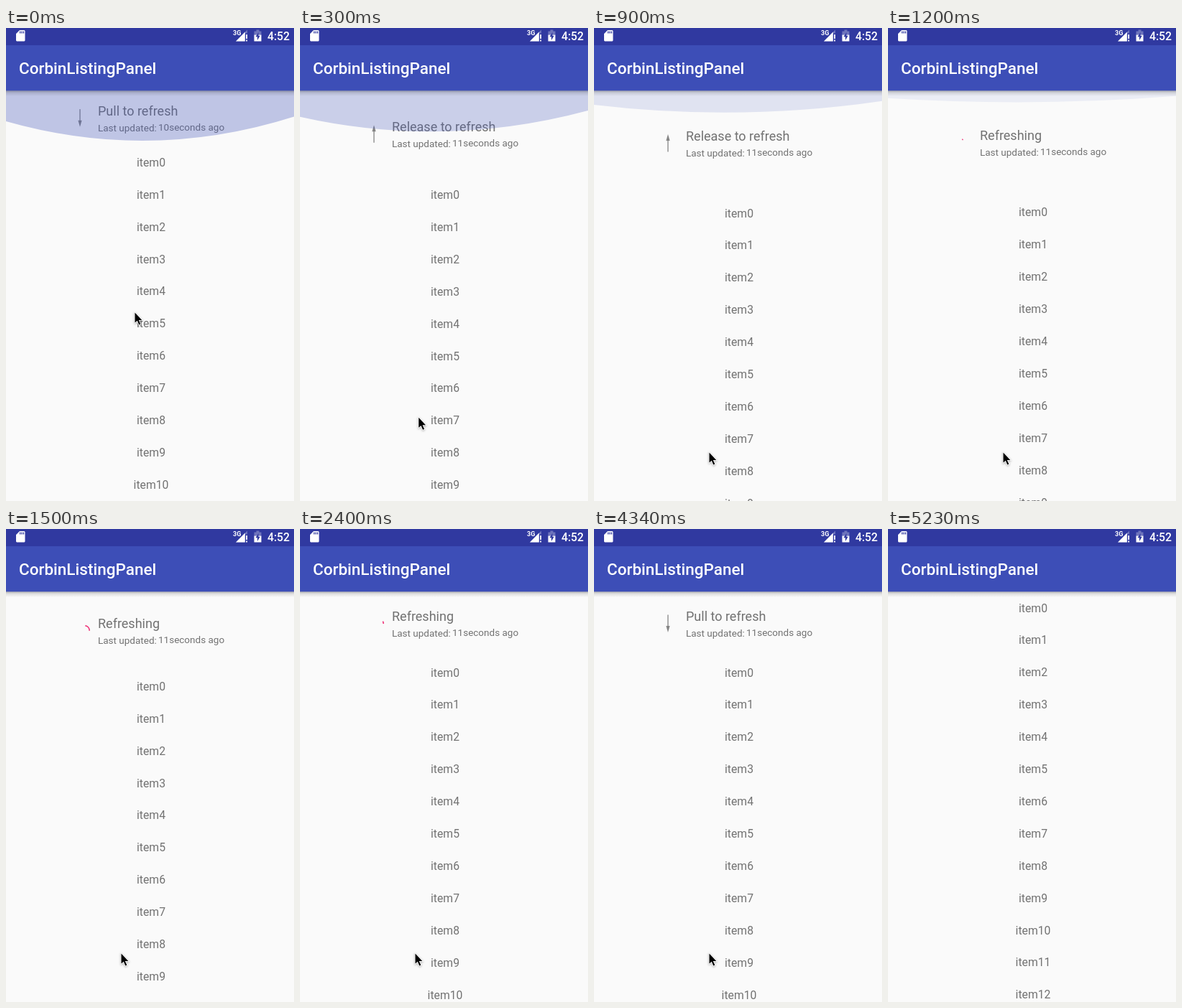
An HTML page with a canvas that plays this animation: 401 px wide and 659 px high, repeating every 6120 ms.

```html
<!DOCTYPE html>
<html lang="en">
<head>
<meta charset="utf-8">
<title>Pull to refresh</title>
<style>
  html, body { margin: 0; width: 100%; height: 100%; overflow: hidden; background: #fafafa; }
  canvas { display: block; }
</style>
</head>
<body>
<canvas id="stage" width="401" height="659"></canvas>
<script>
const ctx = document.getElementById('stage').getContext('2d');
const W = 401, H = 659, BAR = 87, ROW = 44.9;
const LOOP = 6120, TICK = 149.4, STEP = 150, LAST_TICK = 35;
const RELEASE = 1150, DONE = 3450, RESET = 4350, LEAVE = 5250;
const GREY = '#727272', DARK_BLUE = '#3039a0', FAINT = 'rgba(255, 255, 255, 0.3)';
const FAMILY = 'Roboto, "Noto Sans", sans-serif';

const clamp = p => Math.min(1, Math.max(0, p));
const easeOut = p => 1 - (1 - clamp(p)) ** 2;
const easeInOut = p => (1 - Math.cos(Math.PI * clamp(p))) / 2;

// cubic-bezier(.4, 0, .2, 1), solved by bisection
function fastOutSlowIn(p) {
  let lo = 0, hi = 1, s = 0.5;
  for (let i = 0; i < 20; i++) {
    s = (lo + hi) / 2;
    const x = 1.2 * (1 - s) ** 2 * s + 0.6 * (1 - s) * s * s + s ** 3;
    if (x < clamp(p)) lo = s; else hi = s;
  }
  return 3 * s * s - 2 * s ** 3;
}

function text(str, x, y, size, color = GREY, weight = 400, align = 'left') {
  ctx.font = `${weight} ${size}px ${FAMILY}`;
  ctx.fillStyle = color;
  ctx.textAlign = align;
  ctx.fillText(str, x, Math.round(y));
}

function rect(x, y, w, h, color) {
  ctx.fillStyle = color;
  ctx.fillRect(x, y, w, h);
}

function at(x, y, paint) {
  ctx.save();
  ctx.translate(x, y);
  paint();
  ctx.restore();
}

function shape(path, color) {
  ctx.fillStyle = color;
  ctx.fill(new Path2D(path), 'evenodd');
}

function pullDistance(t) {
  if (t < RELEASE) return 77.25 + 70.75 * easeOut(t / 750);
  if (t < RESET) return 148 - 58 * easeInOut((t - RELEASE) / 575);
  return 90 * (1 - easeInOut((t - RESET) / 575));
}

function headerTitle(t) {
  if (t < STEP || t >= RESET) return 'Pull to refresh';
  if (t < RELEASE) return 'Release to refresh';
  return t < DONE ? 'Refreshing' : 'Refreshed successfully';
}

function drawArrow(x, y, turn) {
  at(x, y, () => {
    ctx.rotate(turn * Math.PI);
    rect(-0.75, -12, 1.5, 17, '#959595');
    shape('M-2.6 3.5H2.6L0 12.5Z', '#858585');
  });
}

function drawSpinner(x, y, t) {
  const cycle = 1333, age = t - 1317, phase = (age + cycle) % cycle / cycle;
  const spin = 0.1215 * age - 114;
  const from = 0.75 * fastOutSlowIn(2 * phase - 1) + phase / 4;
  const to = Math.max(from + 0.03, 0.75 * fastOutSlowIn(2 * phase) + phase / 4);
  const radians = part => (part * 360 + spin) * Math.PI / 180;
  ctx.beginPath();
  ctx.arc(x, y, 7.2, radians(from), radians(to));
  ctx.lineWidth = 1.7;
  ctx.strokeStyle = '#f0397c';
  ctx.stroke();
}

function drawHeader(t, pull) {
  const y = BAR + pull / 2, title = headerTitle(t);
  ctx.save();
  ctx.beginPath();
  ctx.rect(0, BAR, W, pull);
  ctx.clip();
  // A title wider than the second line pushes the centred block left.
  ctx.font = `400 18px ${FAMILY}`;
  ctx.translate(Math.min(0, (175 - ctx.measureText(title).width) / 2), 0);
  text(title, 128, y - 4, 18);
  text('Last updated:', 128, y + 18, 13.5);
  text(`${t < STEP ? 10 : 11}seconds ago`, 212, y + 17, 13.5);
  if (t >= RELEASE && t < DONE) drawSpinner(109, y, t);
  else drawArrow(103, y - 0.5, t < RELEASE ? easeInOut(t / 300) : 0);
  ctx.restore();
}

function drawList(pull) {
  for (let i = 0; i < 13; i++) {
    text(`item${i}`, 202, 115.55 + pull + i * ROW, 15.75, GREY, 400, 'center');
  }
}

function cursorPosition(t) {
  const drag = easeOut(t / 600);
  return { x: 179 - 19 * drag, y: 396 + 195 * drag };
}

// A fading parabola whose lowest point leans towards the pointer.
function drawGlow(t) {
  const height = 70 * clamp(1 - t / 1500) ** 0.9;
  if (!height) return;
  const centre = (W / 2 + cursorPosition(t).x) / 2;
  const bend = 1.072e-5 * height;
  const edge = x => BAR + height - bend * (x - centre) ** 2;
  ctx.beginPath();
  ctx.moveTo(0, BAR);
  ctx.lineTo(0, edge(0));
  ctx.quadraticCurveTo(W / 2, edge(0) + bend * centre * W, W, edge(W));
  ctx.lineTo(W, BAR);
  ctx.fillStyle = `rgba(63, 81, 181, ${0.0045 * height})`;
  ctx.fill();
}

function drawBars() {
  const shadow = ctx.createLinearGradient(0, BAR, 0, BAR + 8);
  shadow.addColorStop(0, 'rgba(0, 0, 0, 0.3)');
  shadow.addColorStop(0.4, 'rgba(0, 0, 0, 0.11)');
  shadow.addColorStop(1, 'rgba(0, 0, 0, 0)');
  rect(0, BAR, W, 8, shadow);
  rect(0, 0, W, BAR + 0.3, '#3d4eb7');
  rect(0, 0, W, 24, DARK_BLUE);
  text('CorbinListingPanel', 18, 64, 22.5, '#fff', 500);
  text('4:52', 395, 17, 15.75, '#fff', 500, 'right');
  text('3G', 316, 10, 9, '#fff', 700);
}

function drawStatusIcons() {
  // memory card
  at(14, 3, () => shape('M5 0H11.5L12.5 1V14.5L11.5 15.5H1L0 14.5V5Z M5 1.5V4.5H6.3V1.5Z M7.4 1.5V4.5H8.7V1.5Z M9.8 1.5V4.5H11.1V1.5Z', '#fff'));
  // signal strength
  at(320, 18.4, () => {
    shape('M0 0L16 -16V-11H12.8V0Z', FAINT);
    shape('M0 0L12.8 -12.8V0Z M14.2 0V-1.8H16V0Z M14.2 -3.4V-9.5H16V-3.4Z', '#fff');
  });
  // charging battery
  at(345.5, 2.5, () => {
    shape('M3 0H7V2H10V7H0V2H3Z', FAINT);
    shape('M0 7H10V16H0Z', '#fff');
    shape('M6 3.5L2 9.8H4.5V14.5L8.3 8.2H6Z', DARK_BLUE);
  });
}

function drawCursor(t) {
  const { x, y } = cursorPosition(t);
  const pointer = new Path2D('M.5 .5V14.5L3.8 11.7L6.3 17.5L8.3 16.6L5.8 11H10.3Z');
  at(x, y, () => {
    ctx.shadowColor = 'rgba(0, 0, 0, 0.35)';
    ctx.shadowBlur = 3;
    ctx.shadowOffsetY = 1;
    ctx.strokeStyle = '#fff';
    ctx.lineWidth = 1.6;
    ctx.stroke(pointer);
    ctx.shadowColor = 'transparent';
    ctx.fillStyle = '#000';
    ctx.fill(pointer);
  });
}

function draw(elapsed) {
  const t = STEP * Math.min(LAST_TICK, Math.floor(elapsed % LOOP / TICK));
  const pull = pullDistance(t);
  rect(0, 0, W, H, '#fafafa');
  drawHeader(t, pull);
  drawList(pull);
  drawGlow(t);
  drawBars();
  drawStatusIcons();
  if (t < LEAVE) drawCursor(t);
}

let start;
function frame(now) {
  start ??= now;
  draw(now - start);
  requestAnimationFrame(frame);
}
draw(0);
requestAnimationFrame(frame);
</script>
</body>
</html>
```
